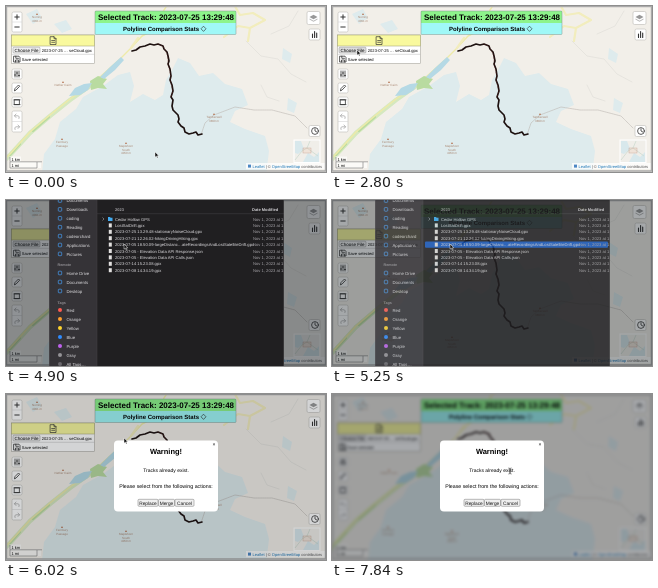
An HTML page that plays this animation: 320 by 166 pixels, repeating every 8 s.

```html
<!DOCTYPE html>
<html lang="en">
<head>
<meta charset="utf-8">
<title>Track upload</title>
<style>
  html, body { margin: 0; width: 100%; height: 100%; overflow: hidden; background: #f2efe9; }
  svg { display: block; }
  #stage { width: 100vw; height: 100vh; }
  text { font-family: "Liberation Sans", Arial, sans-serif; text-rendering: geometricPrecision; white-space: pre; }
  .bold { font-weight: 700; }
  .mid { text-anchor: middle; }
  .line { fill: none; stroke-linecap: round; stroke-linejoin: round; }
</style>
</head>
<body>
<svg id="stage" viewBox="0 0 320 166">
  <g id="page">
    <g id="map">
      <rect x="-20" y="-20" width="360" height="206" fill="#f2efe9"/>
      <g fill="#deebed">
        <path d="M34 186L38 148 49 133 54 116 70 103 77 91 97 80 112 69 124 66 128 80 124 96 137 88 149 94 157 89 160 74 165 66 172 52 184 57 193 70 207 67 219 78 236 83 242 99 229 105 224 116 239 123 259 130 263 145 258 186Z"/>
        <path d="M20 8L31 3 36 12 27 18ZM48 18L60 14 66 23 56 27ZM277 42L286 48 284 57 276 53ZM282 92L291 97 288 107 281 104Z"/>
      </g>
      <g class="line">
        <path d="M-5 158L4 149 24 127 44 110 64 94 84 80" stroke="#d5e8bf" stroke-width="4.5"/>
        <path d="M4 149L14 138M27 125L43 111" stroke="#b9dba0" stroke-width="2.2"/>
        <path d="M-5 157L4 148 24 126 44 109 64 93 84 79 95 70 114 53 125 42 136 30 148 24 158 4 164 -5" stroke="#eeeaa8" stroke-width="1.4"/>
        <path d="M125 42L132 32M218 31L232 20 244 22 259 14 247 7 234 9 226 -5M244 22L242 35" stroke="#f2edbd" stroke-width="2.2"/>
        <path d="M195 129L199 117 208 109 229 101 248 104 266 104 289 110 301 122" stroke="#bcb8b3" stroke-width=".6" stroke-dasharray="1 .8"/>
        <path d="M240 35L255 50 272 53 285 68 300 76M255 79L261 91 273 95M265 28L283 20 292 5" stroke="#dddcd7" stroke-width=".6"/>
      </g>
      <path d="M84 75L92 70 101 73 97 78 101 83 92 82 85 84Z" fill="#b9dba0"/>
      <path d="M63 90L69 82 78 78 86 77 82 84 74 89ZM94 71L103 62 115 51 118 54 109 64 98 73Z" fill="#b5d9e5"/>
      <g id="places" font-size="3"></g>
      <g class="line">
        <path id="track" d="M126 45L130 44 134 41 139 40 144 38 148 39 152 38 157 40 158 43 161 46 162 50 163 55 162 58 164 63 165 70 164 74 166 79 167 85 165 91 167 94 166 100 167 104 172 109 173 113 172 116 175 120 178 122 179 126 183 128 187 127 190 126 192 129 196 128" stroke="#1d1110" stroke-width="1.65"/>
        <path d="M152 38L157 40 162 50 162 58 165 70 164 74 167 85 165 91" stroke="#65221d" stroke-width=".4" stroke-dasharray="1 2"/>
      </g>
    </g>

    <g id="banner">
      <rect x="89" y="5" width="141" height="12" fill="#8df48b"/>
      <rect x="89" y="17" width="141" height="11.5" fill="#a0f8f7"/>
      <rect x="89" y="5" width="141" height="23.5" rx="1" fill="none" stroke="#83958c" stroke-width=".5"/>
      <text class="bold mid" x="160" y="14" font-size="8">Selected Track: 2023-07-25 13:29:48</text>
      <text class="bold" x="117" y="25" font-size="6">Polyline Comparison Stats</text>
      <path d="M197.5 20.2L200 22.8 197.5 25.4 195 22.8Z" fill="none" stroke="#222" stroke-width=".6"/>
    </g>

    <g id="upload">
      <rect x="5.5" y="29" width="83" height="28.5" fill="#fff" stroke="#a8a79f" stroke-width=".6"/>
      <rect x="5.5" y="29" width="83" height="11" fill="#f9f99e" stroke="#a9a97c" stroke-width=".6"/>
      <path class="line" d="M44.5 30.7H48L50 32.7V38.5H44.5ZM48 30.7V32.7H50M45.7 34.5H48.7M45.7 36.3H48.7" stroke="#333" stroke-width=".7"/>
      <rect id="choose" x="7" y="41.2" width="27" height="5.8" rx="1" stroke="#777" stroke-width=".4"/>
      <text class="mid" x="20.5" y="45.7" font-size="4.5">Choose File</text>
      <text x="35.8" y="45.7" font-size="4.1">2023-07-25 … seCloud.gpx</text>
      <path d="M5.5 48.3H88.5" stroke="#bbb" stroke-width=".5"/>
      <text x="15.8" y="54.8" font-size="4.1">Save selected</text>
    </g>

    <g id="buttons"></g>
    <g class="line" stroke="#333" stroke-width=".8">
      <path d="M8.8 11H13.2M11 8.8V13.2M8.8 21H13.2" stroke-width="1"/>
      <path d="M8 50.2H13L14 51.5V56H8ZM9.8 50.2V52.3H12.5M9.5 56V54H12.6V56"/>
      <path d="M9 65V71M11 65V71M13 65V71M8.4 69H9.6M10.4 67H11.6M12.4 69.5H13.6"/>
      <path d="M8.5 84.5L9 82.5 12.5 79 13.7 80.2 10.3 83.8Z"/>
      <path d="M8.6 93.8H13.4V98.6H8.6ZM8 93.8H14M8 98.6H14"/>
      <path d="M10 108L8.4 109.8 10 111.5M8.5 109.8H12Q14 110 13 112.5M12 119L13.6 120.8 12 122.5M13.5 120.8H10Q8 121 9 123.5" stroke="#aaa"/>
      <path d="M306.5 31.5V28M308.6 31.5V25.5M310.7 31.5V27" stroke-width="1.1"/>
      <circle cx="309" cy="125" r="3.4"/>
      <path d="M309 122.8V125L310.8 126"/>
    </g>
    <path d="M307.5 8.8L311.5 11 307.5 13.2 303.5 11Z" fill="#999"/>
    <path d="M303.5 12.6L307.5 14.8 311.5 12.6V13.6L307.5 15.8 303.5 13.6Z" fill="#b5b5b5"/>

    <g id="minimap">
      <rect x="288" y="134" width="26" height="22.5" fill="#f0eee9" stroke="#fff"/>
      <path d="M289 135H295L298 143 292 148 289 147ZM297 156L302 147 308 151 313 146V156Z" fill="#d8e8ec"/>
      <path d="M289 154L296 145 301 142 304 135M301 142L312 150" fill="none" stroke="#c9d8cd" stroke-width=".7"/>
      <rect x="297" y="142" width="8" height="5" fill="#e9a07e" fill-opacity=".15" stroke="#c6a090" stroke-width=".4"/>
    </g>
    <g font-size="4">
      <path d="M4 150.5H15V155.8H4ZM4 156.3H35V162H4Z" fill="#fff" opacity=".65"/>
      <path d="M4 151V155.8H36M4 156V162H31V156" fill="none" stroke="#777" stroke-width=".6"/>
      <text x="5.5" y="154.6">1 km</text>
      <text x="5.5" y="160.8">1 mi</text>
      <rect x="240" y="157" width="80" height="6.2" fill="#fff" opacity=".75"/>
      <rect x="242" y="158.6" width="3" height="3" fill="#4c87c4"/>
      <text x="246.5" y="161.7" fill="#555"><tspan fill="#1b75b5">Leaflet</tspan> | © <tspan fill="#1b75b5">OpenStreetMap</tspan> contributors</text>
    </g>
    <path d="M.5 .5H319.5V165H.5Z" fill="none" stroke="#aaa" stroke-width="1.4"/>
  </g>

  <rect id="shade" x="-5" y="-5" width="330" height="176" fill="#0c1319"/>

  <svg id="sheet" x="43" width="235" height="166" viewBox="43 0 235 166">
    <rect x="43" width="48" height="166" fill="#353337"/>
    <rect x="91" width="187" height="166" fill="#201f21"/>
    <path d="M91 0V166M91 13.7H278" stroke="#444246" stroke-width=".5"/>
    <rect id="selected" x="93" y="41.4" width="183" height="6.4" rx="1" fill="#1558c0"/>
    <g id="sidebar" font-size="4.3"></g>
    <g id="files" font-size="4.15"></g>
    <path d="M43.2 0V166M277.8 0V166" stroke="#646265" stroke-width=".5"/>
  </svg>

  <g id="dialog">
    <rect x="108" y="46.5" width="104" height="71" rx="4" fill="#fff"/>
    <text class="mid" x="208" y="52" font-size="5">×</text>
    <text class="bold mid" x="160" y="60" font-size="7.5">Warning!</text>
    <text class="mid" x="160" y="78" font-size="5">Tracks already exist.</text>
    <text class="mid" x="160" y="94" font-size="5.27">Please select from the following actions:</text>
    <g id="actions"></g>
  </g>

  <g id="cursor">
    <path id="arrow" d="M0 0V5.2L1.3 4.1 2.2 6 3.1 5.6 2.2 3.8H3.8Z" fill="#111" stroke="#fff" stroke-width=".45"/>
    <path id="hand" d="M-1 3L-2 1.3Q-1.5 .6 -.8 1.4V-1Q-.2 -1.8 .4 -1Q1 -2 1.6 -1Q2.3 -1.6 2.8 -.6L3.2 0V2.2L2.4 3.8H-.2Z" fill="#fff" stroke="#444" stroke-width=".6"/>
    <path id="beam" class="line" d="M-1.2 -3Q0 -3 0 -2V2Q0 3 -1.2 3M1.2 -3Q0 -3 0 -2V2Q0 3 1.2 3" stroke="#333" stroke-width=".6"/>
  </g>
</svg>

<script>
const LOOP = 8000;
const $ = id => document.getElementById(id);

function add(parent, tag, attrs, content = "") {
  const node = document.createElementNS("http://www.w3.org/2000/svg", tag);
  for (const key in attrs) node.setAttribute(key, attrs[key]);
  node.textContent = content;
  $(parent).append(node);
}
const label = (parent, x, y, content, fill = "#dedde0", extra = {}) =>
  add(parent, "text", { x, y, fill, ...extra }, content);

function buildMap() {
  [[31, 9, "Norring", "4091 m"], [57, 77, "Nether Cairn"], [56, 134, "Fernbury", "Passage"],
   [120, 138, "Maplehorn", "South", "4050 m"], [208, 109, "Tamberwell", "3890 m"]]
    .forEach(([x, y, ...lines]) => {
      add("places", "path", { d: `M${x - 1} ${y}h2l-1 -2z`, fill: "#b57351" });
      lines.forEach((line, i) => label("places", x, y + 3.4 * (i + 1), line, "#a88570", { class: "mid" }));
    });
  [[6, 6, 10, 20], [6, 63, 10, 10], [6, 77, 10, 10], [6, 91, 10, 10],
   [6, 105, 10, 21], [301, 5.5, 13, 13], [303, 23, 11, 11], [303, 119.5, 11, 11]]
    .forEach(([x, y, width, height]) => add("buttons", "rect",
      { x, y, width, height, rx: 1.5, fill: "#fff", stroke: "#c4c3bf", "stroke-width": .7 }));
  add("buttons", "path", { d: "M6 16H16M6 115.5H16", stroke: "#ccc", "stroke-width": .5 });
}

function buildSidebar() {
  const places = ["Documents", "Downloads", "coding", "Reading", "codeorchard", "Applications", "Pictures"];
  const item = (name, y, tag) => {
    if (tag) add("sidebar", "circle", { cx: 54, cy: y, r: 2, fill: tag });
    else add("sidebar", "rect", { x: 52.3, y: y - 1.8, width: 3.4, height: 3.6, rx: .7, fill: "none", stroke: "#459cf2", "stroke-width": .7 });
    label("sidebar", 60.5, y + 1.6, name);
  };
  const header = (name, y) => label("sidebar", 51.5, y + 1.4, name, "#929095", { "font-size": 3.7, "font-weight": 700 });
  places.forEach((name, i) => item(name, 0.5 + i * 8.9));
  header("Remote", 65);
  ["Home Drive", "Documents", "Desktop"].forEach((name, i) => item(name, 73 + i * 9));
  header("Tags", 102.5);
  const tags = { Red: "#ff5a50", Orange: "#ff9f2e", Yellow: "#ffd52f", Blue: "#2f8cff", Purple: "#bf62ee", Gray: "#949397", "All Tags…": "#68666b" };
  Object.entries(tags).forEach(([name, color], i) => item(name, 110 + i * 9, color));
}

function buildFiles() {
  const names = ["Cedar Hollow GPS", "LostSatDrift.gpx",
    "2023-07-25 13.29.48-stationaryNoiseCloud.gpx", "2023-07-21 12.26.02-hikingDrivingHiking.gpx",
    "2023-07-05 18.50.09-largeDistanc…ateRecordingsAndLostSatelliteDrift.gpx",
    "2023-07-05 - Elevation Data API Response.json", "2023-07-05 - Elevation Data API Calls.json",
    "2023-07-14 15.23.08.gpx", "2023-07-08 14.34.19.gpx"];
  const bold = { "font-weight": 700, "font-size": 4 };
  label("files", 109, 10.7, "2023", "#a5a3a8", bold);
  label("files", 246, 10.7, "Date Modified", "#d0cfd3", bold);
  names.forEach((name, i) => {
    const y = 19 + i * 6.4;
    if (i) add("files", "rect", { x: 102.8, y: y - 2, width: 3, height: 4, fill: "#e2e0df" });
    else {
      add("files", "path", { d: "M96.5 17.5L98 19 96.5 20.5", fill: "none", stroke: "#aaa", "stroke-width": .6 });
      add("files", "path", { d: "M102 17H104L104.6 17.7H106.5V21H102Z", fill: "#42aaf0" });
    }
    label("files", 109, y + 1.5, name);
    label("files", 247, y + 1.5, "Nov 1, 2023 at 1:24 PM", "#a5a3a8");
  });
}

function buildActions() {
  [["Replace", 132, 20], ["Merge", 152.5, 16], ["Cancel", 169, 19]].forEach(([name, x, width]) => {
    add("actions", "rect", { x, y: 105.3, width, height: 7, rx: 1, fill: "#efefef", stroke: "#777", "stroke-width": .5 });
    label("actions", x + width / 2, 110.5, name, "#111", { class: "mid", "font-size": 4.8 });
  });
}

const ramp = (t, start, end) => Math.min(1, Math.max(0, (t - start) / (end - start)));
const ease = p => p * p * (3 - 2 * p);

// Each move is [start, end, x, y].
const moves = [[700, 1470, 25, 44], [3080, 3570, 74, 40], [3780, 4410, 118, 45],
  [4550, 4760, 118, 44], [6580, 7350, 148, 77], [7420, 7840, 178, 77]];

function cursorAt(t) {
  let x = 149, y = 146;
  for (const [start, end, toX, toY] of moves) {
    const p = ease(ramp(t, start, end));
    x += (toX - x) * p;
    y += (toY - y) * p;
  }
  return [x, y];
}

function draw(t) {
  const sheet = ease(ramp(t, 2940, 3220)) * (1 - ease(ramp(t, 5180, 5430)));
  const veil = ramp(t, 5810, 6230);
  const [x, y] = cursorAt(t);
  const pointer = t > 6580 && y > 73 ? "beam" : t > 5430 && t < 5810 ? "hand" : "arrow";

  $("sheet").setAttribute("opacity", sheet);
  $("selected").setAttribute("opacity", t >= 5040 ? 1 : 0);
  $("shade").setAttribute("opacity", 0.46 * sheet + 0.36 * veil);
  $("page").style.filter = veil ? `blur(${1.7 * veil ** 1.5}px)` : "none";
  $("dialog").setAttribute("opacity", ramp(t, 5800, 5950));
  $("choose").setAttribute("fill", t > 1400 && t < 5180 ? "#dcdcdc" : "#efefef");
  $("cursor").setAttribute("transform", `translate(${x} ${y})`);
  for (const id of ["arrow", "hand", "beam"]) $(id).setAttribute("opacity", id === pointer ? 1 : 0);
}

buildMap();
buildSidebar();
buildFiles();
buildActions();
draw(0);
const began = performance.now();
requestAnimationFrame(function tick() {
  draw((performance.now() - began) % LOOP);
  requestAnimationFrame(tick);
});
</script>
</body>
</html>
```
